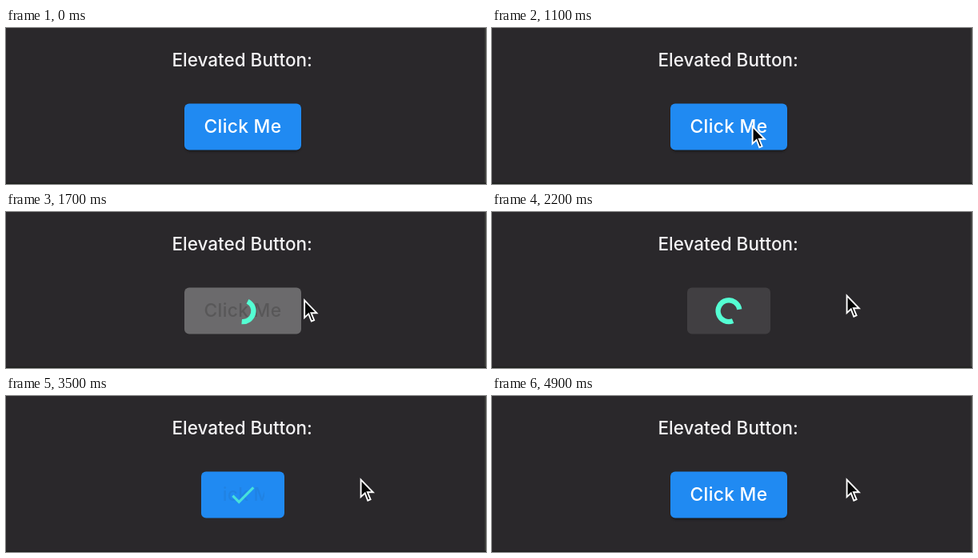
These frames come from a looping animation (600x195 px, 5.3 s). An HTML page:

```html
<!DOCTYPE html>
<html lang="en">
<head>
<meta charset="utf-8">
<title>Elevated Button</title>
<style>
  html, body { margin: 0; width: 100%; height: 100%; overflow: hidden; background: #2a282b; }
  svg { display: block; width: 100vw; height: 100vh; }
  text { font-family: Inter, Roboto, sans-serif; font-weight: 500; text-anchor: middle; }
</style>
</head>
<body>
<svg viewBox="0 0 600 195">
  <defs>
    <clipPath id="labelClip"><rect id="clipBox" y="94.5" height="58"/></clipPath>
    <filter id="blur" x="-10%" y="-20%" width="120%" height="140%"><feGaussianBlur stdDeviation="1.6"/></filter>
  </defs>
  <rect width="600" height="195" fill="#2a282b"/>
  <rect x="598.5" width="1.5" height="195" fill="#41433e"/>
  <rect y="193.5" width="600" height="1.5" fill="#1f211e"/>
  <text x="295.2" y="48" font-size="22.5" fill="#f4f3f5">Elevated Button:</text>

  <rect id="shadow" y="96.5" height="58" rx="6" fill="#000" filter="url(#blur)"/>
  <rect id="button" y="94.5" height="58" rx="6"/>
  <g clip-path="url(#labelClip)">
    <text id="label" x="296" y="130.5" font-size="22.8" letter-spacing=".3">Click Me</text>
  </g>
  <path id="spinner" fill="none" stroke="#54fed3" stroke-width="6.3"/>
  <path id="check" fill="#54fed3" transform="translate(276.8 104.4) scale(1.6)"
        d="M9 16.17 4.83 12 3.41 13.41 9 19 21 7 19.59 5.59Z"/>
  <path id="cursor" fill="#050505" stroke="#fff" stroke-width="1.9"
        d="M1 2.4V24L6.1 19.3 9.7 28.6 13 27.2 9.3 18.2H16.2Z"/>
</svg>
<script>
const LOOP = 5300, STEP = 100;
const CX = 296, CY = 123.7, RADIUS = 13.4;
const WIDE = 146, NARROW = 104, PADDING = 25;
const BLUE = [32, 138, 242], PRESSED = [107, 106, 108], BUSY = [65, 63, 66];

const set = (id, attrs) => {
  const el = document.getElementById(id);
  for (const k in attrs) el.setAttribute(k, attrs[k]);
};
const mix = (a, b, p) => a + (b - a) * p;
const mixRgb = (a, b, p) => a.map((v, i) => Math.round(mix(v, b[i], p)));
const ramp = (t, from, to) => Math.min(1, Math.max(0, (t - from) / (to - from)));
const smooth = p => p * p * (3 - 2 * p);
const easeOut = p => 1 - (1 - p) ** 2;

// Cubic bezier (0.4, 0, 0.2, 1), solved by bisection
function fastOutSlowIn(x) {
  let lo = 0, hi = 1;
  for (let i = 0; i < 20; i++) {
    const s = (lo + hi) / 2, r = 1 - s;
    if (1.2 * s * r * r + 0.6 * s * s * r + s * s * s < x) lo = s; else hi = s;
  }
  return smooth(lo);
}

// The head of the arc runs ahead, then the tail catches up, while all of it turns
function arc(t) {
  const age = Math.max(0, t - 1400), p = age / 1600 % 1;
  const head = 284 * fastOutSlowIn(ramp(p, 0, .5));
  const tail = 284 * fastOutSlowIn(ramp(p, .5, 1));
  const start = age * .262 - 142 + tail;
  const sweep = Math.max(head - tail, .1);
  const point = deg => {
    const a = deg * Math.PI / 180;
    return `${CX + RADIUS * Math.cos(a)} ${CY + RADIUS * Math.sin(a)}`;
  };
  return `M${point(start)}A${RADIUS} ${RADIUS} 0 ${+(sweep > 180)} 1 ${point(start + sweep)}`;
}

function drawButton(t) {
  const press = ramp(t, 1400, 1700), settle = ramp(t, 1700, 1900);
  const back = ramp(t, 3500, 3800), restored = t >= 3500;
  const shrink = smooth(settle) - smooth(ramp(t, 3500, 3900));
  const w = mix(WIDE, NARROW, shrink), x = CX - w / 2;
  const fill = restored ? BLUE : mixRgb(mixRgb(BLUE, PRESSED, press), BUSY, settle);
  const shade = Math.round(mix(40, 255, restored ? back : 1 - press));
  const alpha = restored ? mix(.07, 1, back) : mix(1, .28, press) * (1 - ramp(t, 1700, 1800));
  set('shadow', { x: x + 1, width: w - 2, opacity: .4 * (1 - press + ramp(t, 3500, 4100)) });
  set('button', { x, width: w, fill: `rgb(${fill})` });
  set('clipBox', { x: x + PADDING, width: w - 2 * PADDING });
  set('label', { fill: `rgb(${shade},${shade},${shade})`, opacity: alpha });
}

function drawCursor(t) {
  const enter = easeOut(ramp(t, 700, 1100)), leave = ramp(t, 1500, 1960);
  const x = mix(451, 325, enter) + 118 * smooth(leave);
  const y = mix(105, 121, enter) - 18.5 * easeOut(leave);
  set('cursor', { transform: `translate(${x - .4} ${y - .4})`, opacity: +(t >= 700) });
}

function draw(t) {
  drawButton(t);
  set('spinner', { d: arc(t), opacity: ramp(t, 1400, 1700) * (1 - ramp(t, 2500, 2650)) });
  set('check', { opacity: ramp(t, 2500, 2900) * (1 - ramp(t, 3400, 3800)) });
  drawCursor(t);
}

function tick() {
  const t = performance.now() % LOOP;
  draw(Math.floor(t / STEP) * STEP);
  requestAnimationFrame(tick);
}
tick();
</script>
</body>
</html>
```
